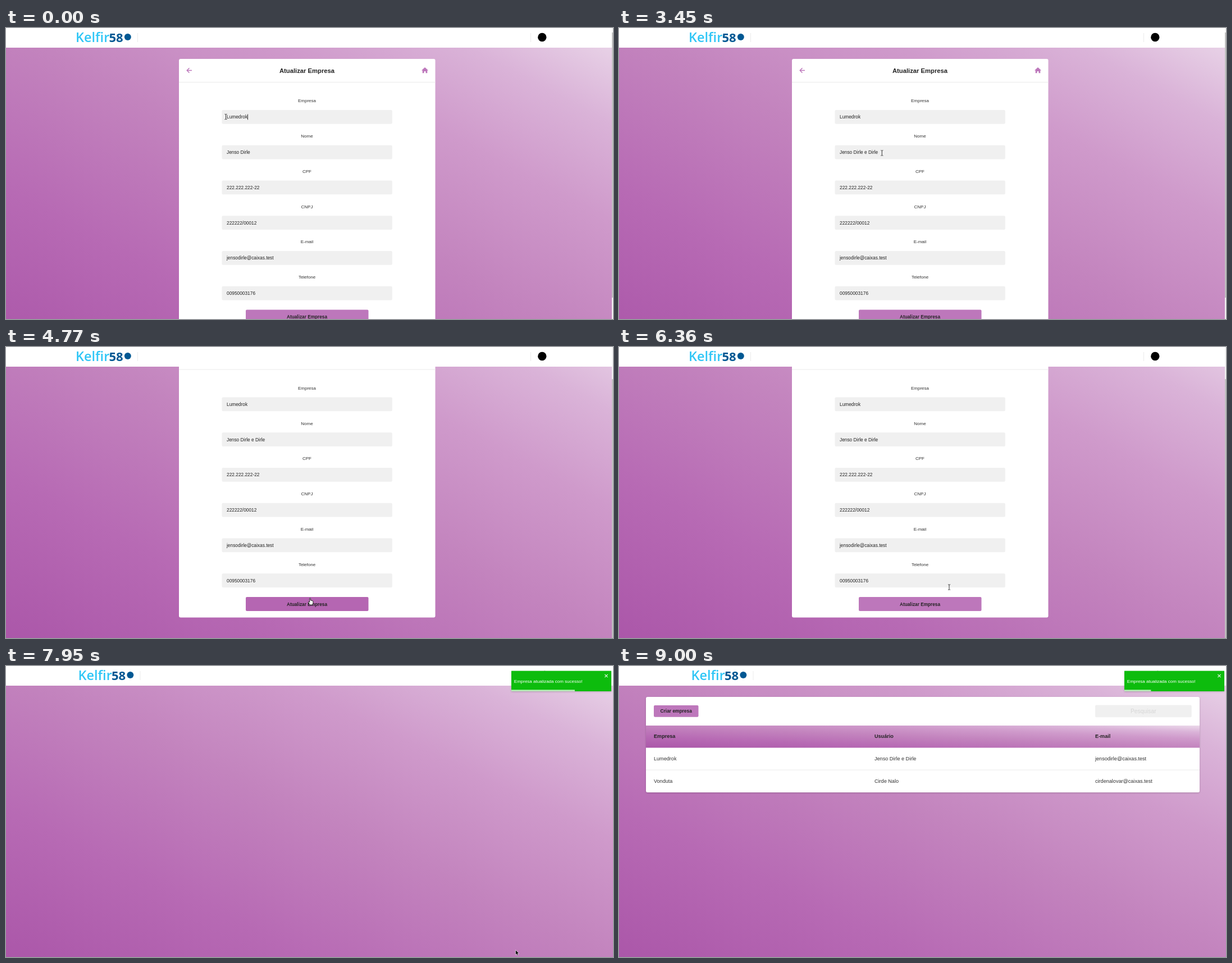
Write an HTML page that moves like this. It is 1081 px wide and 518 px high and loops after 9100 ms.

```html
<!DOCTYPE html>
<html lang="pt-BR">
<head>
<meta charset="utf-8">
<title>Atualizar Empresa</title>
<style>
  html, body { margin: 0; width: 100%; height: 100%; overflow: hidden; background: #fff; }
  svg { display: block; width: 1081px; height: 518px; }
  text { font: 8px "Liberation Sans", Arial, sans-serif; fill: #333; white-space: pre; }
  .mid { text-anchor: middle; }
  .value { font-size: 8.35px; fill: #222; }
  .cell { font-size: 9.1px; }
  .bold { font-weight: 700; fill: #222; }
  .brand { font: 600 23.5px "Open Sans", "Noto Sans", sans-serif; }
  .field { fill: #f0f0f0; }
  .accent { fill: #bd77bb; }
  .rule { stroke: #ebebeb; stroke-width: 1; }
</style>
</head>
<body>
<svg viewBox="0 0 1081 518">
  <defs>
    <linearGradient id="pink" x1="0" y1="1" x2="1" y2="0">
      <stop offset="0" stop-color="#ab57a9"/>
      <stop offset=".25" stop-color="#b76ab4"/>
      <stop offset=".5" stop-color="#c384be"/>
      <stop offset=".7" stop-color="#cf9acb"/>
      <stop offset=".85" stop-color="#dab3d8"/>
      <stop offset="1" stop-color="#ebd9ea"/>
    </linearGradient>
    <filter id="shade" x="-5%" y="-20%" width="110%" height="150%">
      <feDropShadow dx="0" dy="1" stdDeviation="1.5" flood-opacity=".2"/>
    </filter>
  </defs>

  <g id="form">
    <g id="page">
      <rect width="1081" height="575" fill="url(#pink)"/>
      <rect x="308" y="55" width="456.5" height="483" rx="3" fill="#fff"/>
      <path class="rule" d="M308 96.5H764.5"/>
      <path d="M331 75.5H322.5M326.5 71.3L322.2 75.5L326.5 79.7" fill="none" stroke="#bd77bb" stroke-width="1.4"/>
      <path class="accent" d="M746 70L740 75.6H741.7V80.3H744.6V77H747.4V80.3H750.3V75.6H752Z"/>
      <text class="mid bold" x="536" y="80.3" style="font-size:11.25px">Atualizar Empresa</text>
      <g id="fields"></g>
      <rect id="send" class="accent" x="427" y="501.5" width="218.5" height="25" rx="2"/>
      <text class="mid bold" x="536" y="517" style="font-size:8.25px">Atualizar Empresa</text>
      <rect id="caret" width=".8" height="10" fill="#111"/>
    </g>
  </g>

  <g id="list">
    <rect width="1081" height="518" fill="url(#pink)"/>
    <g id="table">
      <rect x="48" y="55" width="986" height="170" rx="3" fill="#fff" filter="url(#shade)"/>
      <rect class="accent" x="62" y="70" width="79.5" height="20.7" rx="2"/>
      <text class="mid bold" x="101.7" y="83.4" style="font-size:8.4px">Criar empresa</text>
      <rect class="field" x="848" y="69.5" width="171.7" height="21.7" rx="2"/>
      <text class="mid" x="933.8" y="84" style="font-size:10.3px;fill:#d6d6d6">Pesquisar</text>
      <rect x="48" y="106" width="986" height="39.5" fill="url(#pink)"/>
      <path class="rule" d="M48 185H1034"/>
      <g id="cells"></g>
    </g>
  </g>

  <rect width="1081" height="35" fill="#fff"/>
  <g id="top">
    <text class="brand" x="124" y="24.6" fill="none"><tspan fill="#2fc6f6">Kelfir</tspan></text>
    <text class="brand" x="183.5" y="24.6" style="font-size:22px;font-weight:700;fill:#005893">58</text>
    <circle cx="216.8" cy="16" r="6" fill="#005893"/>
    <path class="rule" d="M234.5 9V25M934.5 9V25"/>
    <circle cx="954.8" cy="16.5" r="7.7"/>
  </g>
  <g id="bar">
    <rect x="1079" width="2" height="518" fill="#f4f4f4"/>
    <rect id="thumb" x="1079" y="8" width="2" height="472" fill="#c1c1c1"/>
  </g>

  <g id="toast">
    <rect x="900" y="8.7" width="178" height="36.3" fill="#07bc0c" filter="url(#shade)"/>
    <text x="904.8" y="29.7" style="fill:#fff">Empresa atualizada com sucesso!</text>
    <path d="M1066.4 15L1071.6 20.2M1071.6 15L1066.4 20.2" stroke="#fff" stroke-width="1.2" opacity=".85"/>
    <rect id="left" x="900" y="42.3" height="2.7" fill="#fff" opacity=".7"/>
  </g>

  <g id="beam"><path d="M-2 -4.6H-.6L0 -4L.6 -4.6H2M0 -4V4M-2 4.6H-.6L0 4L.6 4.6H2" fill="none" stroke="#222" stroke-width=".9"/></g>
  <g id="arrow"><path d="M0 0V8.6L2 6.9L3.4 10L4.9 9.4L3.5 6.3H6.2Z" stroke="#fff" stroke-width=".6"/></g>
  <g id="hand"><path d="M-2 -5.6Q-1.2 -6.6 -.4 -5.6V-2.2L3.4 -1.2Q4.2 -.8 4.2 0V2.6L3.2 6H-1.6L-4.2 1.6Q-4.4 .2 -3.2 .4L-2 1.6Z" fill="#fff" stroke="#111" stroke-width=".9"/></g>
</svg>
<script>
const LOOP = 9100;
const $ = id => document.getElementById(id);
const person = 'Jenso Dirle', mail = 'jensodirle@caixas.test';

const fields = [
  ['Empresa', 'Lumedrok'], ['Nome', person], ['CPF', '222.222.222-22'],
  ['CNPJ', '222222/00012'], ['E-mail', mail], ['Telefone', '00950003176']
];
const rowY = i => 146 + 62.75 * i;
$('fields').innerHTML = fields.map(([label, value], i) => `
  <text class="mid" x="536" y="${rowY(i) - 13.7}">${label}</text>
  <rect class="field" x="384.5" y="${rowY(i)}" width="303.3" height="24.7" rx="2"/>
  <text class="value" x="393" y="${rowY(i) + 15.4}">${value}</text>`).join('');
const values = document.querySelectorAll('.value');

const rows = [
  ['Empresa', 'Usuário', 'E-mail'],
  ['Lumedrok', person + ' e Dirle', mail],
  ['Vonduta', 'Cirde Nalo', 'cirdenalovar@caixas.test']
];
$('cells').innerHTML = rows.map((row, r) => row.map((s, c) =>
  `<text class="cell ${r ? '' : 'bold'}" x="${62 + 393 * c}" y="${128.4 + 40 * r}">${s}</text>`
).join('')).join('');

// Each step: start time, then the values held until the next step
const typed = [[0, ''], [1620, ' '], [2170, ' e '], [2450, ' e D'], [2570, ' e Di'],
  [2720, ' e Dir'], [2870, ' e Dirle']];
const carets = [[0, 0], [590, -1], [1500, 1], [2020, -1], [2170, 1], [3330, -1],
  [3990, 1], [4500, -1], [4890, 1], [5010, -1]];
const scrolls = [[0, 0], [3600, 38], [3720, 56.5]];
const slides = [[0, 200], [7230, 17], [7380, 6], [7500, -3], [7650, 0]];
const pointer = [
  [0, 'beam', 391.5, 158], [590, 'beam', 402, 164], [710, 'arrow', 421, 180],
  [830, 'arrow', 444, 201], [950, 'beam', 461, 217], [1070, 'beam', 468, 221.5],
  [1620, ''], [3450, 'beam', 468.3, 222.5],
  [3870, 'beam', 481, 239], [3990, 'arrow', 506, 315], [4110, 'arrow', 526, 370],
  [4260, 'beam', 535, 408], [4380, 'beam', 541, 422], [4500, 'arrow', 545, 436],
  [4620, 'hand', 547, 450], [4770, 'hand', 542.7, 453], [4890, 'hand', 543, 456],
  [5010, 'hand', 543, 458.5], [5560, 'hand', 573.8, 452.5],
  [6240, 'arrow', 581, 437], [6360, 'beam', 588, 427.5],
  [6950, 'arrow', 588, 428], [7800, 'arrow', 780, 468], [7950, 'arrow', 907.5, 505.5],
  [8070, 'arrow', 982, 509], [8190, 'arrow', 1012, 511], [8340, '']
];

const at = (steps, t) => steps.findLast(s => s[0] <= t);
const show = (id, on) => { $(id).style.display = on ? '' : 'none'; };
const move = (id, x, y) => $(id).setAttribute('transform', `translate(${x} ${y})`);

function draw(t) {
  const listing = t >= 6950;
  show('form', !listing);
  show('bar', !listing);
  show('list', listing);
  show('table', t >= 8070);
  move('top', listing ? 4.5 : 0, 0);

  if (!listing) {
    const y = at(scrolls, t)[1];
    move('page', 0, -y);
    $('thumb').setAttribute('y', 8 + y * .87);
    $('send').style.fill = t >= 4620 && t < 6240 ? '#b566b2' : '';
    values[1].textContent = person + at(typed, t)[1];
    const focus = at(carets, t)[1];
    show('caret', focus >= 0);
    if (focus >= 0) {
      $('caret').setAttribute('x', 393 + values[focus].getComputedTextLength());
      $('caret').setAttribute('y', rowY(focus) + 7.4);
    }
  }

  show('toast', t >= 7230);
  move('toast', at(slides, t)[1], 0);
  $('left').setAttribute('width', Math.max(0, Math.min(178, 113 - (t - 7950) * .0624)));

  const [, kind, x, y] = at(pointer, t);
  for (const id of ['beam', 'arrow', 'hand']) show(id, id === kind);
  if (kind) move(kind, x, y);
}

const start = performance.now();
function tick() {
  draw((performance.now() - start) % LOOP);
  requestAnimationFrame(tick);
}
tick();
</script>
</body>
</html>
```
